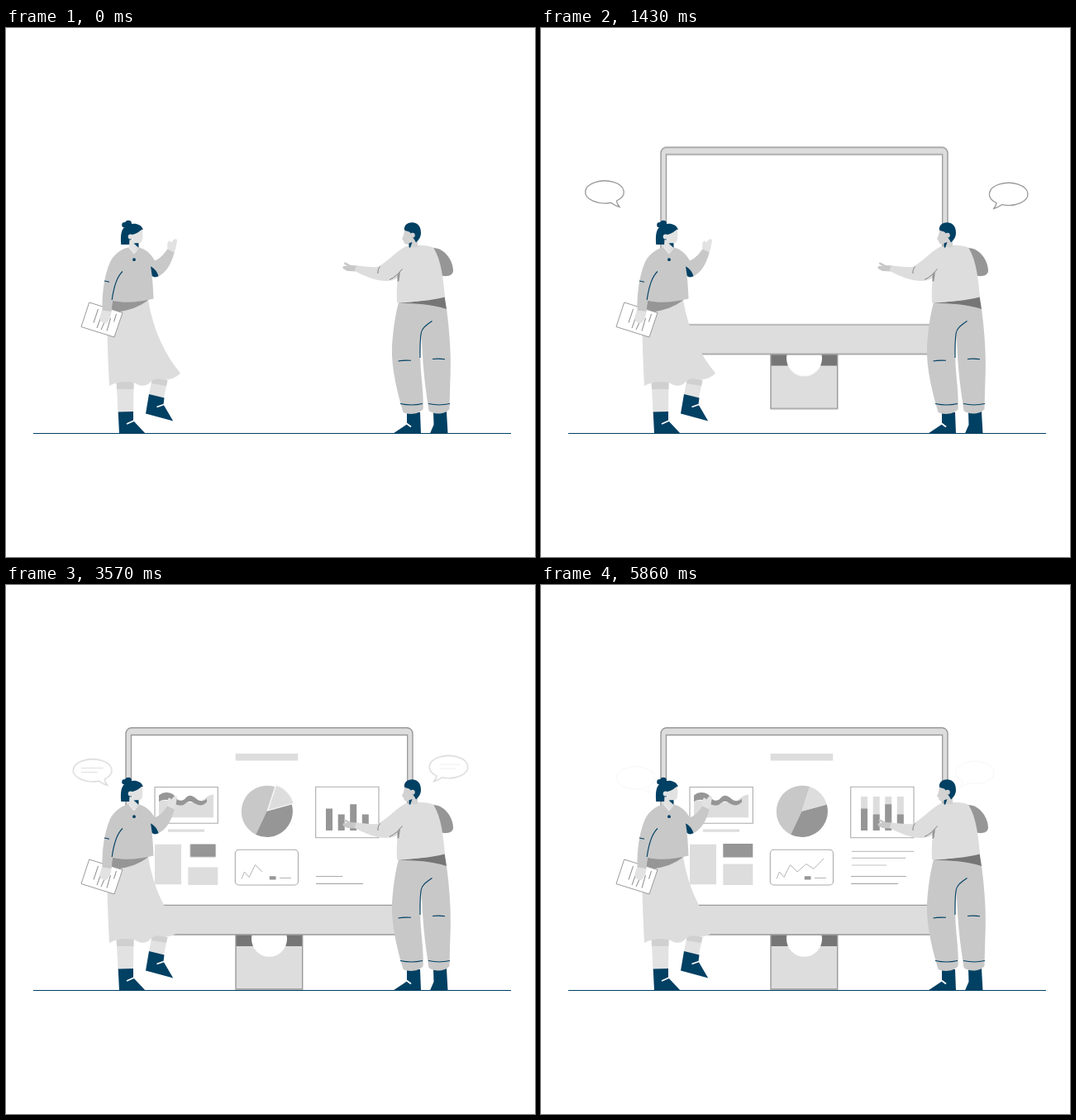
Animation, 640 px wide and 640 px high, one loop 6 s. Source, as an HTML page:

```html
<!DOCTYPE html>
<html lang="en">
<head>
<meta charset="utf-8">
<title>Presenting a dashboard</title>
<style>
html, body { margin: 0; width: 100%; height: 100%; overflow: hidden; background: #fff; }
svg { display: block; width: 100%; height: 100%; }

.navy { fill: #004063; }
.pale { fill: #e2e2e2; }
.light { fill: #ddd; }
.mid { fill: #c8c8c8; }
.gray { fill: #969696; }
.dark { fill: #767676; }
.white { fill: #fff; }
.edge { stroke: #999; }
.seam { fill: none; stroke: #004063; stroke-width: 1.1; }
.lace { stroke: #fff; stroke-width: 1.8; }
.thin { fill: none; stroke: #b5b5b5; }

.anim, .bubble, .note, .line {
  animation: 6s cubic-bezier(.65, 0, .35, 1) infinite both;
  transform-box: fill-box;
}

.monitor { animation-name: drop; }
@keyframes drop {
  0%, 2.6% { transform: translateY(-385px); }
  31.1%, to { transform: none; }
}

.bubble {
  animation-name: float, glow;
  animation-timing-function: cubic-bezier(.65, 0, .35, 1), linear;
}
@keyframes float {
  0%, 3.3%, 45%, 98.8%, to { transform: translate(var(--x), var(--y)); }
  17.2%, 23.8%, 80.8%, 82% { transform: none; }
}
@keyframes glow {
  0%, 3.3%, 45%, 98.8%, to { opacity: 0; }
  17.2%, 23.8%, 80.8%, 82% { opacity: 1; }
}
.note { animation-name: note; }
@keyframes note {
  0%, 17% { opacity: 1; }
  22%, 31% { opacity: 0; }
  37%, 88% { opacity: 1; }
  94%, to { opacity: 0; }
}

.first { animation-name: first; animation-timing-function: linear; }
@keyframes first {
  0%, 29.2% { opacity: 0; }
  51.7%, to { opacity: 1; }
}
.second { animation-name: second; animation-timing-function: linear; }
@keyframes second {
  0%, 45.5% { opacity: 0; }
  56.5%, to { opacity: 1; }
}

.slice { animation-name: slice; }
@keyframes slice {
  0%, 29.2%, 63.3%, 97.5%, to { transform: none; }
  50.2%, 82%, 83.3% { transform: translate(16px, -14.5px); }
}

.trend { stroke-dasharray: 1 1; animation-name: trend; }
@keyframes trend {
  0%, 50%, 95%, to { stroke-dashoffset: 0; }
  69.3%, 70% { stroke-dashoffset: 1; }
}

.tile { transform-origin: center; animation-name: tile; }
@keyframes tile {
  0%, 50%, 95%, to { transform: none; }
  56.5%, 76.7% { transform: scale(.86, .94); }
}
.block { transform-origin: bottom; animation-name: block; }
@keyframes block {
  0%, 50%, 96.7%, to { transform: none; }
  56.5%, 83% { transform: scaleY(.85); }
}

.bars { transform-origin: bottom; animation-name: bars; }
@keyframes bars {
  0%, 46% { transform: scaleY(0); }
  58%, to { transform: none; }
}
.slots { transform-origin: bottom; animation-name: slots; }
@keyframes slots {
  0%, 61% { transform: scaleY(0); }
  78%, to { transform: none; }
}

.line { fill: none; stroke-dasharray: 1 1.1; }
@keyframes line1 { 0%, 48% { stroke-dashoffset: 1.05 } 58%, to { stroke-dashoffset: 0 } }
@keyframes line2 { 0%, 54% { stroke-dashoffset: 1.05 } 65%, to { stroke-dashoffset: 0 } }
@keyframes line3 { 0%, 60% { stroke-dashoffset: 1.05 } 70%, to { stroke-dashoffset: 0 } }
@keyframes line4 { 0%, 65% { stroke-dashoffset: 1.05 } 75%, to { stroke-dashoffset: 0 } }
@keyframes line5 { 0%, 70% { stroke-dashoffset: 1.05 } 80%, to { stroke-dashoffset: 0 } }
</style>
</head>
<body>
<svg viewBox="0 0 640 640">
  <defs>
    <clipPath id="stage"><path d="M0 107H640V640H0Z"/></clipPath>
    <clipPath id="foot"><path d="M278 423.5H359V489H278Z"/></clipPath>
  </defs>

  <g clip-path="url(#stage)">
    <g class="anim monitor">
      <path class="light" d="M278 423H359V489H278Z"/>
      <path class="dark" d="M278 423H359V437H278Z"/>
      <path class="edge" fill="none" stroke-width="1.4" d="M278 423H358.7V489H278Z"/>
      <circle class="white" cx="318.5" cy="428.3" r="21.5" clip-path="url(#foot)"/>
      <rect class="light edge" stroke-width="1.4" x="145" y="172.7" width="347" height="250.3" rx="7"/>
      <path class="white edge" stroke-width="1.3" d="M151.500 387V181.500H485.700V387"/>
      <path class="edge" stroke-width="1.3" d="M145 387.300H492"/>
    </g>
  </g>

  <!-- dashboard -->
  <g class="anim second">
    <g fill="none" stroke="#aaa" stroke-width="1.1">
      <path d="M180 244.500H256.300V288.300H180Z"/>
      <path d="M374.700 244.300H451V305.700H374.700Z"/>
      <rect x="277.300" y="320.200" width="76.200" height="42.800" rx="4.500"/>
    </g>
    <path class="light" d="M196 295.500H240V298.800H196ZM180 313.800H212V362.300H180Z"/>
    <path class="gray anim tile" d="M220.300 313H256.300V329.600H220.300Z"/>
    <path class="light anim block" d="M220.300 337.500H256.300V363H220.300Z"/>
    <path class="light anim slots" d="M387 256H395V297H387ZM401.700 256H409.700V297H401.700ZM416.200 256H424.200V297H416.200ZM430.800 256H438.800V297H430.800Z"/>
    <path class="gray anim bars" d="M387 270.500H395V297H387ZM401.700 277.500H409.700V297H401.700ZM416.200 265.300H424.200V297H416.200ZM430.800 277.500H438.800V297H430.800Z"/>
  </g>
  <g stroke="#c2c2c2" stroke-width="1.2">
    <path class="line" pathLength="1" style="animation-name:line1" stroke="#aaa" d="M375 361.300H432"/>
    <path class="line" pathLength="1" style="animation-name:line2" stroke="#aaa" d="M375 352.500H442"/>
    <path class="line" pathLength="1" style="animation-name:line3" d="M376 339H418"/>
    <path class="line" pathLength="1" style="animation-name:line4" d="M376 330.300H441"/>
    <path class="line" pathLength="1" style="animation-name:line5" d="M376 322.300H451"/>
  </g>
  <g class="anim first">
    <path class="light" d="M277.700 204H353.200V212.600H277.700Z"/>
    <path class="light" d="M185 260L215 263L233 263C240 261 242 254 251 253.500V281.300H185Z"/>
    <path class="gray" d="M185 254.500C190 250 198 250 203 254C208 262 213 263 218 257C224 251 229 258 233 260.500C237 262 240 261 243 258.500V262.500C238 268 233 267 228 264C222 260 220 262 215 266C209 268 204 265 200 262C195 259 190 259 185 262Z"/>
    <path class="mid" d="M315.500 273.700L325.200 244A31.300 31.300 0 0 0 302.200 302Z"/>
    <path class="gray" d="M315.500 273.700L345.800 265.500A31.300 31.300 0 0 1 302.200 302Z"/>
    <path class="light anim slice" d="M315.500 273.700L325.200 244A31.300 31.300 0 0 1 345.800 265.500Z"/>
    <path class="thin anim trend" pathLength="1" d="M285 355.500L288.500 347L294 353.500L301.500 338.500L310 347L321 337.500L330 343.500L342 331"/>
    <path class="gray" d="M318.800 352.300H326.500V356.500H318.800Z"/>
    <path class="thin" stroke="#ccc" d="M331 354.500H345"/>
  </g>

  <!-- speech -->
  <g class="bubble" style="--x:37.5px;--y:35px">
    <path class="white edge" stroke-width="1.3" d="M91.600 209A23.300 13.600 0 1 0 84.500 211.300C88 214 91 215.500 95 216.500C93 214 91.600 212 91.600 209Z"/>
    <path class="note thin" stroke-width="1.2" d="M63 195.600H90M63 200.700H83"/>
  </g>
  <g class="bubble" style="--x:-41px;--y:26px">
    <path class="white edge" stroke-width="1.3" d="M551 211.500A23.300 13.600 0 1 1 557.600 213.700C554.500 216 551.500 217.500 547.800 218.500C549.500 216 551 214 551 211.500Z"/>
    <path class="note" stroke="#d8d8d8" stroke-width="1.1" d="M555 198H580M555 203H574"/>
  </g>

  <path stroke="#004063" stroke-width="1.2" d="M33 490.500H611"/>

  <!-- woman -->
  <g>
    <path class="pale" d="M133.500 425H154.500L154 466H135.500ZM177 422L195.500 426L190.500 449L173 444Z"/>
    <path fill="#d0d0d0" d="M133.500 425H154.500V437H134ZM177 422L195.500 426L194 433L176 430Z"/>
    <path class="navy" d="M135.700 464.500L154 464V475L168.500 490.500H137ZM173 443L191.500 447.500L190.500 455.500L202.200 475.500L169 466.500Z"/>
    <path class="lace" d="M146 479L155 475M182.500 458.500L191 455.500"/>
    <path class="light" d="M172 329C178 365 192 395 211 417.500C205 424 197 426 191 425C185 424 180 423 175 428C170 434 162 434 157 430C150 427 135 427 125 433C124 412 123 392 122.500 368L134 342Z"/>
    <path class="gray" d="M129 329L173 328.500C162 337 149 342 134 343.500L127 340Z"/>
    <path class="white edge" d="M100.700 332L141 344.500L131 374L91 361.500Z"/>
    <path class="thin" style="stroke:#888" d="M111.500 340L106 356.500M118 341L110 363M120 354L115 365M126.500 351L122 366.500M133.500 346L130.500 355.500"/>
    <path class="pale" d="M195.500 268C195 264 195 260 196.500 258C198 257 199 258 200 259.500C202 257 204 254.500 206 255.500C207.500 256.500 207 258 206.500 260C206 264 205 268 203.500 272Z"/>
    <path class="mid" d="M148 265.500C140 267 130 274 126 283C119 299 116 320 116.500 342L127.500 343.500L129 330C145 333.500 162 331.500 178.500 327.500C178 314 177 302 175.500 290L184 300.500C194 296 200 285 203.700 271.500L195.300 267.500C191 274 186 279 180 281.500C176 274 169 267 160 265.500Z"/>
    <path class="navy" d="M175 288.500C179 290.500 182.500 294 184.500 300.300C181.500 302 178.500 301.700 176.700 300Z"/>
    <path class="seam" d="M141 294.500C134 301 130 316 128.200 329M119 306L125 307.300"/>
    <path class="pale" d="M116 341.500L127.500 343C127 349 125 354 121 357C117 357 114 355 113 351Z"/>
    <path class="navy" d="M139.200 262C138.500 250 139 243 146 239C153 235 163 236 165.800 243.500C162 248 157 249 153 251L150 262Z"/>
    <circle class="navy" cx="148" cy="236.800" r="4"/>
    <circle class="navy" cx="143.500" cy="238.300" r="3.300"/>
    <path class="pale" d="M149.500 256L159 258V265.500L155 272.500L148.800 265.500Z"/>
    <path class="navy" d="M154.500 260.500L160.500 260V266Z"/>
    <path class="pale" d="M152 250C157 250 161 246 165 243.500C165.500 249 165.600 254 164.500 258C162 261.500 157 260.500 153.500 257.500Z"/>
    <circle class="pale" cx="150.700" cy="252.500" r="3"/>
    <path fill="none" stroke="#fff" stroke-width=".8" d="M148.800 265.500L154.800 273L160.500 266"/>
    <circle class="navy" cx="155" cy="280.200" r="1.900"/>
  </g>

  <!-- man -->
  <g>
    <path class="navy" d="M485 465H501L502 490.500H468.500L485 479.500ZM517 464H533L534.500 490.500H513L517.500 480Z"/>
    <path class="lace" d="M484 478L490 482.500"/>
    <path class="mid" d="M475 332C495 330 520 334 533 339.500C537 370 539 400 537.300 430L536.500 461C531 468 517 468 511.500 463C508.500 440 504.500 420 502.800 372L501.200 398C501.500 420 505.500 440 504.700 461C499 468 487 468 480.500 465C470 430 465 400 467.500 378C469 360 471.500 345 475 332Z"/>
    <path class="seam" d="M515.500 354.500C506 361 503 364 502.200 369C500.500 380 501 390 501 399M474.500 403C479 402 484 402 490 402.300M516 400.500C521 400 526 400 531 400.800M477 454.500C486 456.500 495 456.500 504 454.500M511 454.500C520 456.500 528 456.500 537 454.500"/>
    <path class="dark" d="M475 333C495 331 515 329 530.500 324L533 340C515 334 495 333 475 333Z"/>
    <path class="gray" d="M515 266C531 265 541 282 541 294C540 301 531 301 524 299Z"/>
    <path class="mid" d="M425 287.500L417 287L410.500 283.500C408.500 283 408.500 285 410 286.200L413 288L408.500 288C407 289 407 291 408.500 291.500L413 294L423 294.500Z"/>
    <path class="light" d="M483 264.500C495 262 508 262 517 265.500C527 281 529 305 531 325.500C515 330 490 331.500 473 332.500C472.500 320 473 311 474 302C470 305 464 306 460 306C447 306 433 300 421.500 293.500L424 287.300C433 288.500 442 290 450 289C460 284 470 272 483 264.500Z"/>
    <path class="gray" d="M473.500 299L477 294.500L475.500 306L473.500 307Z"/>
    <path fill="none" stroke="#777" stroke-width=".9" d="M452.500 288.500C450.500 291 449.700 294 450 297M479.500 291.500C475 297 470 302 464 304.500"/>
    <path fill="#d2d2d2" d="M482 243L494 245L498 255V265C494 266 490 265 487.500 264.500L488 262C484 262 481 261 481.300 258L479 255C481 251 482 248 482 243Z"/>
    <path class="navy" d="M487.500 260.500L491.500 259L489 266L487.500 265ZM482 244.500C481 238 487 235 492 235.300C499 236 502 241 502 248C502 253 499 257 496 259.500C494.500 257 493.500 254 491 253L489.500 248C488 246 485 246 482 244.500Z"/>
    <circle fill="#d2d2d2" cx="491.800" cy="250.800" r="3"/>
  </g>
</svg>
</body>
</html>
```
